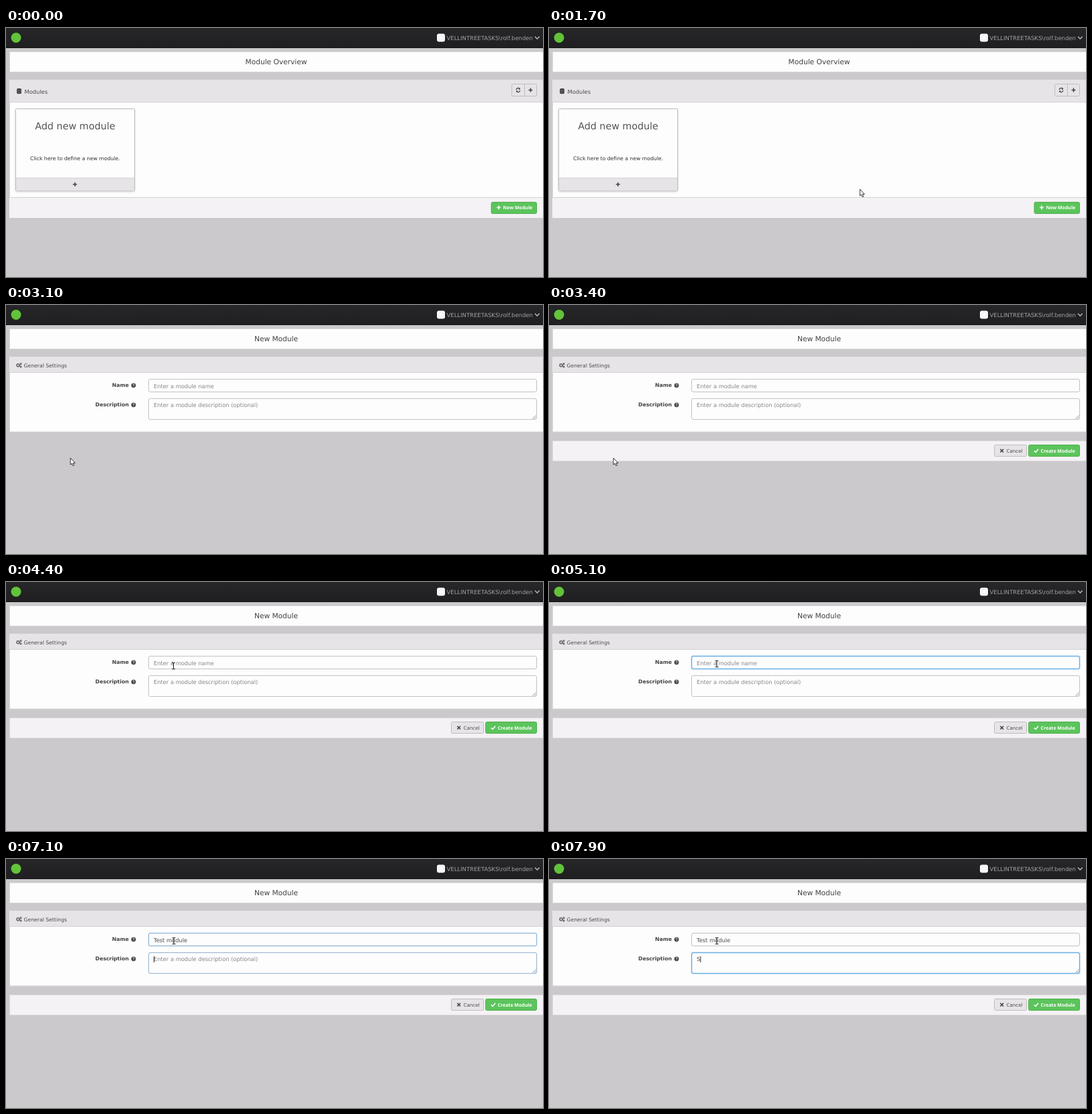
An HTML page that plays this animation: 800 px wide and 371 px high, repeating every 8 s.

```html
<!DOCTYPE html>
<html lang="en">
<head>
<meta charset="utf-8">
<title>Module Overview</title>
<style>
  html, body { margin: 0; width: 100%; height: 100%; overflow: hidden; background: #cbc9cb; }
  svg { display: block; width: 100vw; height: 100vh; }
  text { font-family: "DejaVu Sans", sans-serif; font-size: 8.3px; fill: #4c4b4d;
         white-space: pre; text-rendering: geometricPrecision; }
  .title { font-size: 10.6px; text-anchor: middle; fill: #414042; }
  .label { font-size: 7.73px; font-weight: 700; text-anchor: end; fill: #434244; }
  .hint { fill: #858386; }
  .go { font-family: "Noto Sans", sans-serif; font-size: 7px; font-weight: 700; fill: #fff; }
  .panel { fill: #fefdfe; stroke: #d9d7d9; }
  .bar { fill: #e6e4e6; }
  .foot { fill: #f4f2f4; }
  .rule { stroke: #d3d1d3; fill: none; }
  .button { fill: #e6e4e6; stroke: #bfbdbf; }
  .green { fill: #5cc45c; stroke: #4fb14f; }
  .field { fill: #fefdfe; stroke: #c3c1c3; }
  .line { fill: none; stroke: #434244; stroke-width: 1.6; }
  .white { stroke: #fff; }
  .focus rect { fill: none; stroke: #66afe4; }
  .focus .glow { stroke-width: 3; opacity: .25; }
  .caret { stroke: #222; stroke-width: .9; }
</style>
</head>
<body>
<svg viewBox="0 0 800 371" preserveAspectRatio="none">
  <defs>
    <linearGradient id="dark" x2="0" y2="1">
      <stop stop-color="#272628"/><stop offset="1" stop-color="#1f1e20"/>
    </linearGradient>
    <filter id="soft" x="-10%" y="-10%" width="120%" height="120%">
      <feGaussianBlur stdDeviation="1.4"/>
    </filter>
    <path id="plus" d="M-3 0H3M0-3V3"/>
    <g id="help">
      <circle r="3.4" fill="#434244"/>
      <path d="M-1.2-.8C-1-2.3 1.3-2.1 1.2-.7C1.1 0 0 0 0 .9M0 1.5V2.3" fill="none" stroke="#fff" stroke-width=".8"/>
    </g>
  </defs>

  <rect width="800" height="371" fill="#cbc9cb"/>
  <rect width="800" height="30" fill="url(#dark)"/>
  <path d="M0 29.5H800" stroke="#151416"/>
  <circle cx="15" cy="14.5" r="7.5" fill="#62c33a"/>
  <rect x="642" y="8.5" width="12" height="12" rx="3" fill="#fbfafc"/>
  <circle cx="648" cy="14.5" r="3.8" fill="none" stroke="#e4e5ee" stroke-width=".8"/>
  <text x="656.5" y="17.5" style="font-size:8.47px;fill:#a3a1a4">VELLINTREETASKS\rolf.benden</text>
  <path d="M788 12.8L791.3 16.2L794.6 12.8" class="line" style="stroke:#b5b3b6"/>

  <rect x="5.5" y="35.5" width="800" height="30" class="panel"/>
  <text id="title" x="402.5" y="54" class="title"></text>

  <g id="overview">
    <rect x="5.5" y="77.5" width="800" height="205" class="panel"/>
    <rect x="5" y="77" width="795" height="33" class="bar"/>
    <rect x="5" y="253" width="795" height="30" class="foot"/>
    <path d="M5 110.5H800M5 252.5H800" class="rule"/>
    <path d="M16 91V97C17 98.6 22 98.6 23 97V91C22 89.5 17 89.5 16 91Z" fill="#434244"/>
    <path d="M16 92.3Q19.5 94 23 92.3M16 95Q19.5 96.7 23 95" fill="none" stroke="#8e8c8f" stroke-width=".6"/>
    <text x="27.5" y="97.5">Modules</text>
    <rect x="753.5" y="83.5" width="37" height="18" rx="2" class="button"/>
    <path d="M772.5 84V101" stroke="#bfbdbf"/>
    <path d="M760.2 92A2.8 2.8 0 0 1 765 90.3M765.8 93A2.8 2.8 0 0 1 761 94.7" class="line" style="stroke-width:1.2"/>
    <path d="M766 89V91.8H763.2ZM760 96V93.2H762.8Z" fill="#434244"/>
    <use href="#plus" x="781.5" y="92.5" class="line"/>

    <rect x="14.5" y="121" width="177" height="122.5" rx="1" fill="#777579" opacity=".55" filter="url(#soft)"/>
    <rect id="hover" x="14" y="120" width="178" height="124" rx="1" fill="#3e3c40" opacity="0" filter="url(#soft)"/>
    <rect x="14.5" y="120.5" width="177" height="122" rx="1" fill="#fefdfe" stroke="#c0bec0"/>
    <rect x="15" y="223" width="176" height="19.5" class="bar"/>
    <path d="M15 223.5H191" class="rule"/>
    <text x="103" y="151" text-anchor="middle" style="font-size:14.25px;fill:#555356">Add new module</text>
    <text x="103" y="196.5" text-anchor="middle" style="font-size:7.7px;fill:#2f2e30">Click here to define a new module.</text>
    <use href="#plus" x="102.7" y="233" class="line"/>

    <rect x="723" y="259.5" width="67.500" height="17" rx="2" class="green"/>
    <use href="#plus" x="734" y="267.5" class="line white"/>
    <text x="740.5" y="270.2" class="go">New Module</text>
  </g>

  <g id="form">
    <rect x="5.5" y="77.5" width="800" height="111.500" class="panel"/>
    <rect x="5" y="77" width="795" height="23" class="bar"/>
    <path d="M5 100.5H800" class="rule"/>
    <circle cx="18" cy="89.8" r="2" class="line" stroke-dasharray="1.6 .4"/>
    <circle cx="22" cy="87.7" r="1.1" class="line" style="stroke-width:1"/>
    <circle cx="22" cy="92" r="1.1" class="line" style="stroke-width:1"/>
    <text x="26.5" y="92.5" style="font-size:7.7px">General Settings</text>

    <text x="183" y="122.300" class="label">Name</text>
    <use href="#help" x="190" y="119.800"/>
    <text x="183" y="151.300" class="label">Description</text>
    <use href="#help" x="190" y="148.800"/>

    <rect x="212.500" y="110.500" width="578" height="19" rx="2.500" class="field"/>
    <rect x="212.500" y="139.500" width="578" height="31" rx="2.500" class="field"/>
    <path d="M784.500 169.500L789.500 164.500M787.500 169.500L789.500 167.500" stroke="#777" stroke-width=".8"/>
    <g id="nameFocus" class="focus">
      <rect x="212.500" y="110.500" width="578" height="19" rx="2.500" class="glow"/>
      <rect x="212.500" y="110.500" width="578" height="19" rx="2.500"/>
    </g>
    <g id="descFocus" class="focus">
      <rect x="212.500" y="139.500" width="578" height="31" rx="2.500" class="glow"/>
      <rect x="212.500" y="139.500" width="578" height="31" rx="2.500"/>
    </g>
    <text id="name" x="220" y="123.500"></text>
    <text id="desc" x="220" y="152.200"></text>
    <path id="caret" d="M.5 -7.500V2" class="caret"/>
  </g>

  <g id="actions">
    <rect x="5.5" y="202.500" width="800" height="30" class="panel foot"/>
    <rect x="663.500" y="208.500" width="48" height="17" rx="2" class="button"/>
    <path d="M672.300 214.800L677 219.500M677 214.800L672.300 219.500" class="line"/>
    <text x="681.500" y="219.800" style="font-size:7.1px">Cancel</text>
    <rect x="714.500" y="208.500" width="76" height="17" rx="2" class="green"/>
    <path d="M722.800 217.200L725 219.400L729 214.700" class="line white"/>
    <text x="732.500" y="219.800" class="go">Create Module</text>
  </g>

  <path id="arrow" d="M0 0V10L2.300 8L3.900 11.600L5.500 10.900L4 7.400H7Z" fill="#fff" stroke="#222" stroke-width=".9"/>
  <path id="beam" d="M-2.500 -4.800H-.7L0 -4.200L.7 -4.800H2.500M-2.500 4.800H-.7L0 4.200L.7 4.800H2.500M0 -4.200V4.200" fill="none" stroke="#222" stroke-width="1.100"/>
</svg>
<script>
  const LOOP = 8000, STEP = 100;
  const $ = id => document.getElementById(id);
  const show = (id, on) => $(id).setAttribute('display', on ? 'inline' : 'none');
  const fade = (id, v) => $(id).setAttribute('opacity', v);
  const place = (id, x, y) => $(id).setAttribute('transform', `translate(${x} ${y})`);
  const ramp = (t, a, b) => Math.min(1, Math.max(0, (t - a) / (b - a)));
  const easeOut = p => 1 - (1 - p) ** 2;
  const smooth = p => p * p * (3 - 2 * p);

  // Pointer legs: start, end, from, to, easing
  const legs = [
    [1500, 2300, [751, 259], [93, 216], easeOut],
    [2600, 2900, [93, 216], [96, 228], smooth],
    [3600, 4400, [96, 228], [249.5, 125], smooth],
    [4400, 4500, [249.5, 125], [250, 122], smooth]
  ];
  const word = 'Test module';
  const keys = [5300, 5500, 5700, 5800, 6000, 6200, 6300, 6400, 6500, 6600, 6800];
  const FOCUS = 4600, TAB = 7100, DESC_KEY = 7800;

  function pointer(t) {
    const [a, b, from, to, ease] = legs.filter(l => t >= l[0]).pop() || legs[0];
    const p = ease(ramp(t, a, b));
    return from.map((v, i) => v + (to[i] - v) * p);
  }

  function fill(id, value, placeholder) {
    $(id).textContent = value || placeholder;
    $(id).setAttribute('class', value ? '' : 'hint');
  }

  function drawForm(t) {
    const name = word.slice(0, keys.filter(k => t >= k).length);
    const desc = t >= DESC_KEY ? 'S' : '';
    fill('name', name, 'Enter a module name');
    fill('desc', desc, 'Enter a module description (optional)');
    fade('nameFocus', ramp(t, FOCUS - 100, FOCUS + 200) * (1 - ramp(t, TAB - 100, TAB + 100)));
    fade('descFocus', ramp(t, TAB - 100, TAB + 200));

    const inDesc = t >= TAB;
    const field = $(inDesc ? 'desc' : 'name');
    const typed = inDesc ? desc : name;
    const last = [FOCUS, ...keys, TAB, DESC_KEY].filter(k => t >= k).pop();
    show('caret', t >= FOCUS && (t - last) % 1000 < 500);
    place('caret', 220 + (typed ? field.getComputedTextLength() : 0), inDesc ? 152.2 : 123.5);
  }

  function draw(now) {
    const t = Math.floor(now % LOOP / STEP) * STEP;
    const onForm = t >= 3100;
    $('title').textContent = onForm ? 'New Module' : 'Module Overview';
    show('overview', !onForm);
    show('form', onForm);
    show('actions', t >= 3200);
    fade('hover', .75 * ramp(t, 2000, 2400));
    if (onForm) drawForm(t);

    const [x, y] = pointer(t);
    const overField = onForm && x > 212 && (y < 130 || y > 139 && y < 171);
    show('arrow', t >= 1500 && !overField);
    show('beam', overField);
    place('arrow', x, y);
    place('beam', x, y);
  }

  const start = performance.now();
  function tick() {
    draw(performance.now() - start);
    requestAnimationFrame(tick);
  }
  tick();
</script>
</body>
</html>
```
